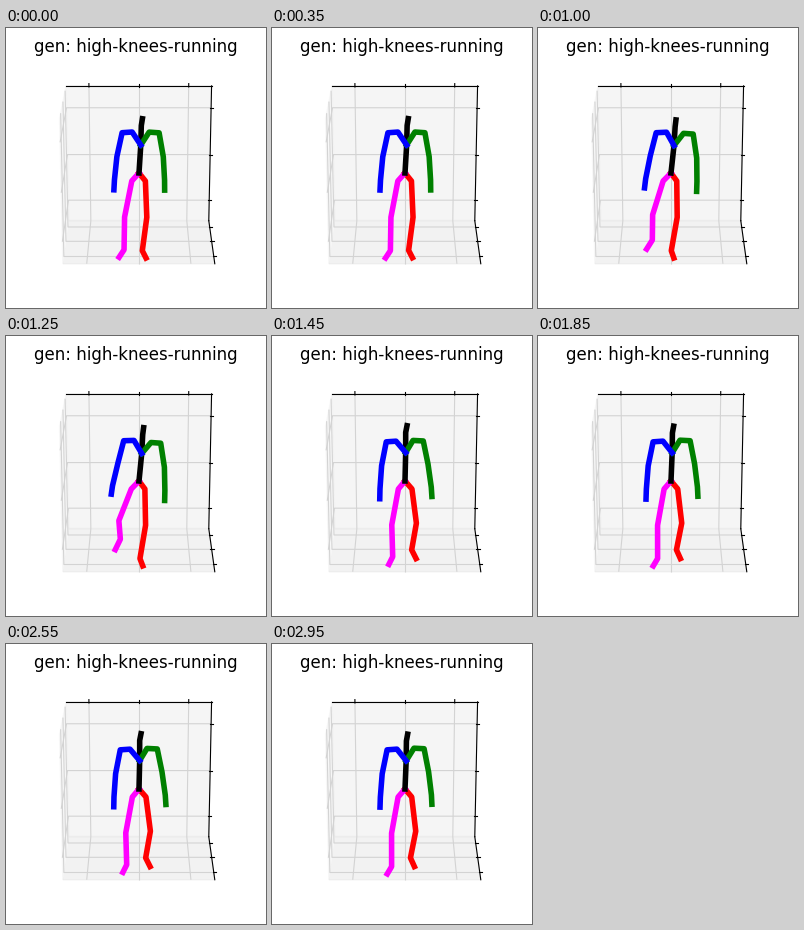
A matplotlib script that plays this animation: 260x280 px, repeating every 3000 ms.

```python
import numpy as np
import matplotlib.pyplot as plt
from matplotlib.animation import FuncAnimation

W, H, DPI = 260, 280, 100
FRAMES, STEP_MS = 60, 50
STRIDE = 22                        # frames per full stride
LEFT_PEAK, RIGHT_PEAK, SWAY_PEAK = 45, 33, 43.5
LEFT, RIGHT = -1, 1

# Joints from the root outward, in stage pixels: half = distance from the
# body's midline, sway = shift with the torso, out/rise = move of a lifted
# limb, drop = sinking while the other side is lifted.
ARM = dict(axis=(134.5, 104, 0.02),
           half=np.array([8.5, 18.5, 23.2, 25, 25.3]),
           y=np.array([104, 104.7, 128.7, 152, 162]),
           sway=np.array([3.7, 3.2, 2.2, 0.6, 0]),
           out=np.array([0, 0, 0, 3, 3.5]),
           rise=np.array([0.5, 0, -2.5, -3, -5]), drop=3.2)
LEG = dict(axis=(133, 148, 0.075),
           half=np.array([6.8, 11, 9.1, 13.4]),
           y=np.array([153, 189.3, 222.7, 230]),
           sway=np.array([-1, -2.5, -4.7, -6.5]),
           out=np.array([0, 6, 1.8, 0.8]),
           rise=np.array([0, -6, -25, -21]), drop=0)


def wave(t, peak):
    return np.cos(2 * np.pi * (t - peak) / STRIDE)


def effort(t):
    """Near rest at first, then easing into the full run."""
    u = np.clip((t - 12) / 12, 0, 1)
    return 0.04 + 0.96 * u * u * (3 - 2 * u)


def lift(t, peak):
    return effort(t) * ((1 + wave(t, peak)) / 2) ** 3


def limb(part, side, sway, own, other):
    mid, top, slant = part["axis"]
    x = (mid - slant * (part["y"] - top) + part["sway"] * sway
         + side * (part["half"] + part["out"] * own))
    y = part["y"] + part["rise"] * own + part["drop"] * other
    return np.column_stack([x, y])


def pose(t):
    sway = effort(t) * wave(t, SWAY_PEAK)
    left, right = lift(t, LEFT_PEAK), lift(t, RIGHT_PEAK)
    pelvis = (133, 145)
    chest = (134.7 + 1.9 * sway, 117 + 0.8 * sway)
    neck = (135.2 + 2.8 * sway, 97.5 + 2 * sway)
    head = (136.3 + 2.4 * sway, 90.7 + 1.8 * sway)
    return [
        np.vstack([pelvis, limb(LEG, RIGHT, sway, right, left)]),
        np.vstack([pelvis, limb(LEG, LEFT, sway, left, right)]),
        np.array([pelvis, chest, neck, head]),
        np.vstack([chest, limb(ARM, RIGHT, sway, right, left)]),
        np.vstack([chest, limb(ARM, LEFT, sway, left, right)]),
    ]


def make_room(fig):
    side = 231
    room = fig.add_axes([14.2 / W, 16.5 / H, side / W, side / H],
                        projection="3d")
    room.view_init(elev=110, azim=-90)
    lim = 0.7 * 25 / 24
    room.set(xlim=(-lim, lim), ylim=(-lim, lim), zlim=(-lim, lim))
    for axis in (room.xaxis, room.yaxis, room.zaxis):
        axis.set_ticks([-0.5, 0, 0.5], labels=[])
    room.set_title("gen: high-knees-running", fontsize=12)


plt.rcParams["grid.color"] = "#d3d3d3"
fig = plt.figure(figsize=(W / DPI, H / DPI), dpi=DPI, facecolor="white")
make_room(fig)

stage = fig.add_axes([0, 0, 1, 1])
stage.set(xlim=(0, W), ylim=(H, 0))
stage.axis("off")
lines = [stage.plot([], [], color=c, lw=4)[0]
         for c in ("red", "magenta", "black", "green", "blue")]


def draw(t):
    for line, joints in zip(lines, pose(t)):
        line.set_data(*joints.T)
    return lines


anim = FuncAnimation(fig, draw, frames=FRAMES, interval=STEP_MS,
                     repeat=True, repeat_delay=0)
plt.show()
```
